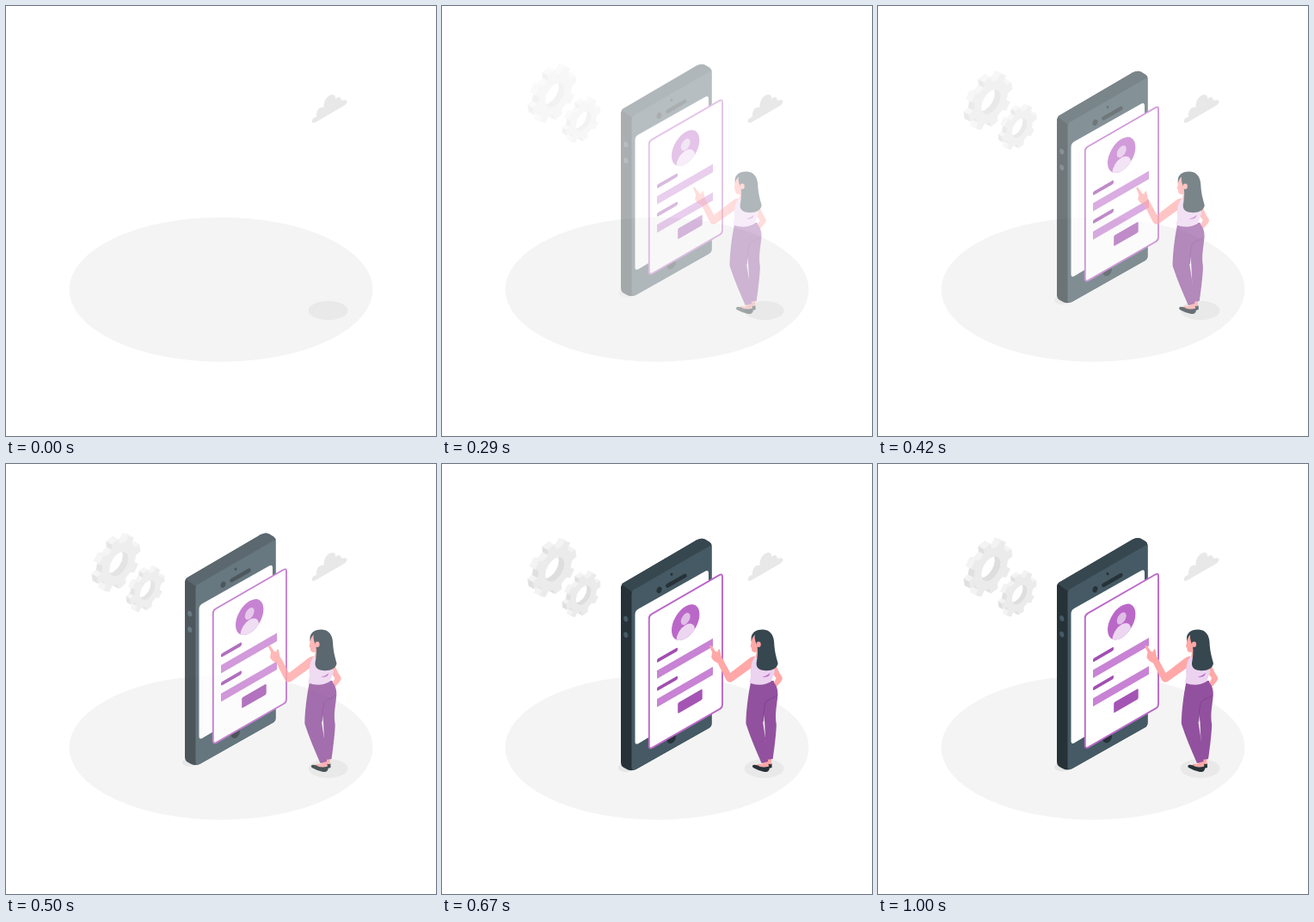
Write an HTML page that moves like this. It is 500 by 500 pixels and loops after 1040 ms.

```html
<!DOCTYPE html>
<html lang="en">
<head>
<meta charset="utf-8">
<title>Sign-in illustration</title>
<style>
  html, body { margin: 0; width: 100%; height: 100%; overflow: hidden; background: #fff; }
  svg { display: block; width: 100vw; height: 100vh; }
</style>
</head>
<body>
<svg viewBox="0 0 500 500">
  <ellipse cx="250" cy="329.7" rx="176.5" ry="84" fill="#f4f4f4"/>
  <ellipse cx="374.6" cy="354" rx="23" ry="11" fill="#e9e9e9"/>
  <path fill="#e8e8e8" d="M356 135C355 132 358 129.500 361 129C360.500 122 364 117 369.500 118C369 110 374 103 380 103C383 103.500 383.500 106 383 108.500C386 104.500 390 105.500 389.800 110C393 108.500 397 109 396.500 111.500C396.300 114 393 116 390 117.800L361 134.600C358.500 136 356.500 136.600 356 135Z"/>

  <g id="gears"></g>

  <g id="phone">
    <ellipse cx="214" cy="352.500" rx="9" ry="5" fill="#e6e6e6"/>
    <path fill="#263238" d="M208 142Q208 139.500 211 137.500L296 87.800Q301.500 84.700 306 87L311 90Q313.500 91.500 313.500 95V301Q313.500 304.500 310.500 306.300L226 354Q220 357 215 354.300L211 352Q208 350 208 346Z"/>
    <path fill="#37474f" d="M209 139.200Q209.500 138.400 211 137.500L296 87.800Q301.500 84.700 306 87L311 90Q313.500 91.500 313.500 95L221 148Z"/>
    <path fill="#455a64" d="M220.500 150Q220.500 147 223 145.500L310 95.300Q313.500 93.300 313.500 96V301Q313.500 304.500 310.500 306.300L226 354Q220.500 356.800 220.500 352Z"/>
    <path fill="#fff" d="M224.500 174Q224.500 170 228 168L306 124Q310 122 310 126V272Q310 275 307 277L228 324.500Q224.500 326 224.500 322Z"/>
    <g fill="#263238">
      <path d="M262.300 140.900L282.500 129.200" stroke="#263238" stroke-width="4.500" stroke-linecap="round"/>
      <ellipse cx="252.500" cy="145.800" rx="2.800" ry="3.800" transform="rotate(20 252.500 145.800)"/>
      <ellipse cx="267" cy="127.700" rx="1.400" ry="1.800"/>
      <ellipse cx="266.500" cy="317.500" rx="5.200" ry="7" transform="rotate(20 266.500 317.500)"/>
    </g>
    <g fill="#455a64">
      <ellipse cx="213.800" cy="179.500" rx="2.500" ry="3.400" transform="rotate(-20 213.800 179.500)"/>
      <ellipse cx="213.800" cy="198" rx="2.500" ry="3.400" transform="rotate(-20 213.800 198)"/>
    </g>
    <path fill="#fff" stroke="#ba68c8" stroke-width="1.900" d="M240.800 179Q240.800 175.500 244 173.700L322.500 128.500Q326 126.700 326 130V279Q326 282.500 323 284.200L244.500 329.300Q240.800 331 240.800 327.500Z"/>
    <g transform="matrix(.866 -.5 0 1 283.200 183.500)">
      <clipPath id="avatar"><circle r="18.700"/></clipPath>
      <circle r="18.700" fill="#ba68c8"/>
      <circle cy="-4" r="6.300" fill="#e0bde6"/>
      <ellipse cy="15" rx="12.500" ry="12" fill="#ecd6f0" clip-path="url(#avatar)"/>
    </g>
    <g id="form"></g>
  </g>

  <g id="woman">
    <path fill="#ffa8a7" d="M383 234L388.500 236Q391.500 243 395 248Q395.700 250 394 252.500L388.500 259L384.500 256L388 249L382 241Z"/>
    <path fill="#ffa8a7" d="M377 341L382.500 341L382 350L378 351ZM371.500 345L378 345L379 353L366 352L366 348.800L372.500 349Z"/>
    <path fill="#263238" d="M379 348.500Q381.500 350 382.800 348L383 353L379.500 354Z"/>
    <path fill="#263238" d="M360.300 351Q361.500 348.700 366 350.300Q371 354 380 351.500V355Q379 358.700 374 358Q367 356.500 362 353.500Q360 352.500 360.300 351Z"/>
    <path fill="#92519e" d="M371 272L374.500 300L376.500 344L384 343C386 330 388 312 388.200 303C386 290 389 280 389.800 268C390 260 387 255 383 252Z"/>
    <path fill="#92519e" d="M358.500 253C355 270 353 288 352.800 302C358 318 364 332 371 348L378.500 346C378 330 374 312 372.500 300L375 279L388 268L385 252Z"/>
    <path fill="none" stroke="#7a3f87" stroke-width=".8" d="M388.800 269C385 273 378 273 375.500 277C374 283 373 291 372.700 300"/>
    <path fill="#ffa8a7" d="M360 199C358.500 203 359.500 206 358.500 210L357.800 212.500L359.300 213.500C359 218 361.500 219.500 365 218.800L364 225L372 231L375 205Z"/>
    <path fill="#ecd3f0" d="M362.500 223.500C358.500 229 357.200 239 358.500 246L356.800 254.500Q371 259.500 382 253L386.500 241L382 232L370 227Z"/>
    <path fill="#ba68c8" d="M372 247.500Q377 246.500 381 243L379.500 246.200Q376 248.300 372 247.500Z"/>
    <path fill="#ffa8a7" d="M363.500 223.500Q361 223 358 225L334.500 243L326 227L324 224L322.300 215.500Q320.500 214.500 319.800 218.500L317.500 218L312.300 210.800Q310 210 310.800 213L313.500 219L312.500 225Q315 229.500 320 231.500L329.500 250.500Q332.500 256 337.500 252.500L358.500 237.500C359 232 360.500 227 363.500 223.500Z"/>
    <path fill="#37474f" d="M359 203C358.500 197 364 192 373 192.500C381 193 385 199 385.500 207C386 218 388 224 390 232C389 238 382 241 374 240C368 239.500 364.500 237 365 231C366 225 367 219 366 212C364 207 362.500 203 363 199C360.500 200.500 359.500 204 359 207Z"/>
    <ellipse cx="367.500" cy="209.800" rx="2.600" ry="3.200" fill="#ffa8a7"/>
  </g>
</svg>
<script>
const LOOP = 1040, FPS = 24, BLANK = 130, TRAVEL = 30;
const $ = id => document.getElementById(id);

function add(parent, tag, attrs) {
  const node = document.createElementNS("http://www.w3.org/2000/svg", tag);
  for (const name in attrs) node.setAttribute(name, attrs[name]);
  return parent.appendChild(node);
}

// Rectangle lying in the isometric plane of the card.
function bar(x, y, width, height, rx, fill) {
  add($("form"), "rect", { width, height, rx, fill, transform: `matrix(1 -.577 0 1 ${x} ${y})` });
}
for (const y of [0, 33]) {
  bar(250, 226.3 + y, 24, 4.3, 1.5, "#a04fb0");
  bar(250, 239.5 + y, 65, 9.6, 0, "#c883d4");
}
bar(274.2, 277.3, 28.5, 12.4, 1.5, "#a455b4");

function gear(cx, cy, radius, teeth, turn, dx, dy) {
  const root = $("gears");
  const project = (r, a) => [cx + .866 * r * Math.cos(a), cy + r * Math.sin(a) - .5 * r * Math.cos(a)];
  const back = ([x, y]) => [x + dx, y + dy];
  const polygon = (points, fill) => add(root, "polygon", {
    points: points.map(p => p.map(v => v.toFixed(2))).join(" "), fill, stroke: fill, "stroke-width": .2
  });
  const step = 2 * Math.PI / teeth;
  const outline = [];
  for (let i = 0; i < teeth; i++) {
    const a = turn + i * step;
    for (const [r, offset] of [[.79, -.29], [1, -.2], [1, .2], [.79, .29]])
      outline.push(project(radius * r, a + offset * step));
  }
  polygon(outline.map(back), "#ebebeb");
  outline.forEach((p, i) => {
    const q = outline[(i + 1) % outline.length];
    const ex = q[0] - p[0], ey = q[1] - p[1];
    if (ey * dx - ex * dy <= 0) return;
    polygon([p, q, back(q), back(p)], ex > Math.abs(ey) * .3 ? "#f3f3f3" : "#e0e0e0");
  });
  polygon(outline, "#ebebeb");
  const plane = (x, y) => `matrix(.866 -.5 0 1 ${x} ${y})`;
  const r = radius * .44, id = "hole" + cx;
  const clip = add(root, "clipPath", { id });
  add(clip, "circle", { r, transform: plane(cx, cy) });
  add(root, "circle", { r, transform: plane(cx, cy), fill: "#dedede" });
  const inner = add(root, "g", { "clip-path": `url(#${id})` });
  add(inner, "circle", { r, transform: plane(cx + dx, cy + dy), fill: "#fff" });
}
gear(131.2, 121.8, 29, 8, -.17, -6.5, -3.5);
gear(164.5, 152, 23, 8, -.1, -4.8, -2.7);

// Cubic Bezier easing (.36, -.01, .5, 1.38), which overshoots near the end.
function ease(x) {
  const curve = (a, b, s) => 3 * a * s * (1 - s) ** 2 + 3 * b * s * s * (1 - s) + s ** 3;
  let low = 0, high = 1;
  for (let i = 0; i < 24; i++) {
    const mid = (low + high) / 2;
    if (curve(.36, .5, mid) < x) low = mid; else high = mid;
  }
  return curve(-.01, 1.38, low);
}

function draw(time) {
  const t = time % LOOP;
  const step = Math.floor((t + 3.4) * FPS / 1000);
  const amount = t < BLANK ? 0 : ease(Math.min(1, (step + .97) / FPS));
  const shift = TRAVEL * (amount - 1);
  const place = (id, x, y) => {
    $(id).setAttribute("transform", `translate(${x} ${y})`);
    $(id).setAttribute("opacity", Math.max(0, Math.min(1, amount)));
  };
  place("gears", 0, shift);
  place("phone", 0, shift);
  place("woman", shift, 0);
}

const start = performance.now();
function tick() {
  draw(performance.now() - start);
  requestAnimationFrame(tick);
}
tick();
</script>
</body>
</html>
```
